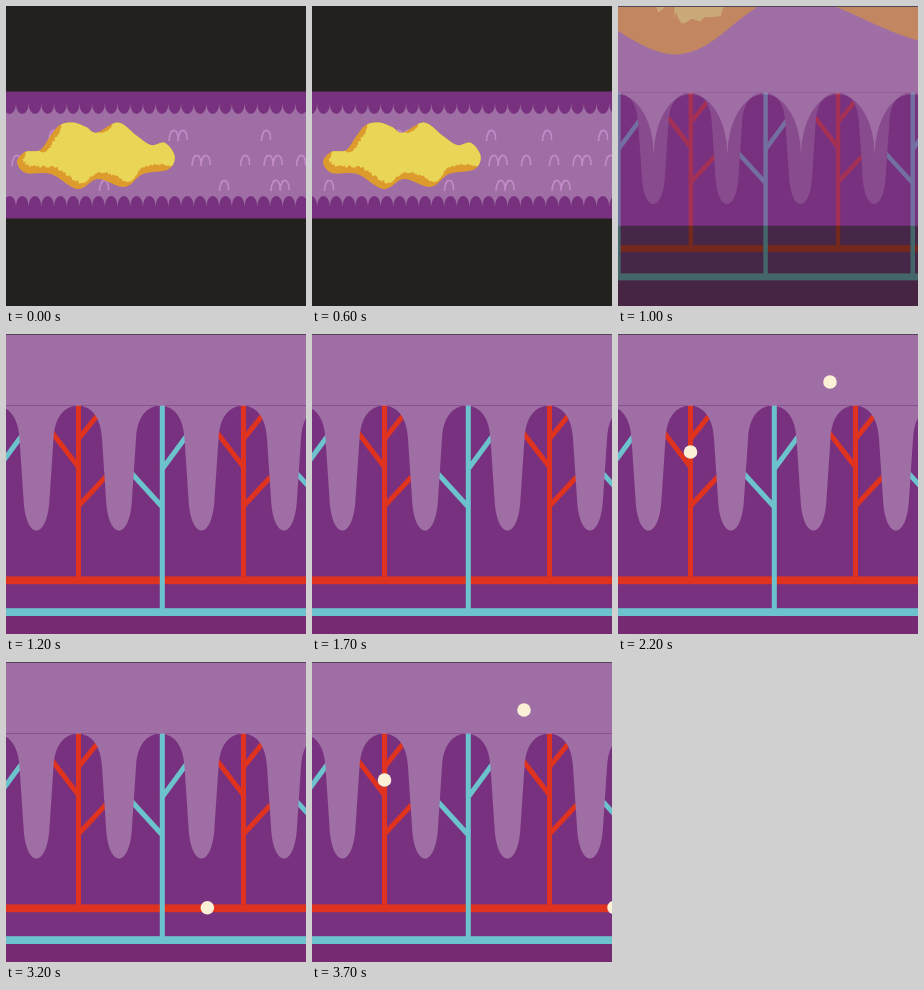
An HTML page with a canvas that plays this animation: 300 px wide and 300 px high, repeating every 3800 ms.

```html
<!DOCTYPE html>
<html lang="en">
<head>
<meta charset="utf-8">
<title>Absorption in the intestine</title>
<style>
html, body { margin: 0; width: 100%; height: 100%; overflow: hidden; background: #22211e; }
canvas { position: absolute; left: 0; top: 0; width: 100%; height: 100%; }
</style>
</head>
<body>
<canvas id="tube" width="300" height="300"></canvas>
<canvas id="villi" width="300" height="300"></canvas>
<script>
const [tubeCtx, villiCtx] = ['tube', 'villi'].map(id => document.getElementById(id).getContext('2d'));
const LOOP = 3800, STEP = 100, ZOOM = 6.5, FOCUS = [75.5, 211.1];
const BLACK = '#22211e', PINK = '#9f6ea4', PURPLE = '#78317f', MARK = '#c48bca',
  YELLOW = '#ead656', ORANGE = '#dd9b2d', RED = '#df321f', TEAL = '#6dc3cd', CREAM = '#fcf0d6';
let ctx = tubeCtx;

const clamp = v => Math.max(0, Math.min(1, v));
const smooth = v => (v = clamp(v)) * v * (3 - 2 * v);
const lerp = (a, b, f) => a + (b - a) * f;
const rand = n => Math.abs(Math.sin(n * 127.1) * 43758.5453) % 1;

function rect(color, x, y, w, h) {
  ctx.fillStyle = color;
  ctx.fillRect(x, y, w, h);
}

function zoomed(scale, paint) {
  ctx.save();
  ctx.translate(...FOCUS);
  ctx.scale(scale, scale);
  ctx.translate(-FOCUS[0], -FOCUS[1]);
  paint();
  ctx.restore();
}

// Key points of the food lump, joined by a closed Catmull-Rom curve.
const LUMP = [[11, 156], [19, 146], [34, 144], [45, 129], [54, 119], [67, 116.5], [80, 121],
  [90.5, 126.7], [112, 116.5], [131, 130], [145, 139], [159, 137], [168.6, 150.5], [162, 163.5],
  [137, 168], [118.5, 181], [92, 173], [71.5, 183], [45, 168], [20, 167]];

function edge(u) {
  const n = LUMP.length, i = Math.floor(u), f = u - i;
  const [a, b, c, d] = [-1, 0, 1, 2].map(k => LUMP[(i + k + n) % n]);
  return [0, 1].map(k => b[k] + 0.5 * f * (c[k] - a[k] +
    f * (2 * a[k] - 5 * b[k] + 4 * c[k] - d[k] + f * (3 * (b[k] - c[k]) + d[k] - a[k]))));
}

function food() {
  const outer = [], inner = [];
  for (let k = 0; k < LUMP.length * 20; k++) {
    const [x, y] = edge(k / 20), [x2, y2] = edge(k / 20 + 0.01);
    const len = Math.hypot(x2 - x, y2 - y), nx = (y2 - y) / len, ny = (x - x2) / len;
    // Edges facing down and left are shaded, with a bristly inner rim.
    const shade = Math.sqrt(clamp(0.6 * ny - 0.8 * nx + 0.2));
    const depth = shade * (6 + 3.5 * rand(k));
    outer.push([x, y]);
    inner.push([x - nx * depth, y - ny * depth]);
  }
  for (const [color, points] of [[ORANGE, outer], [YELLOW, inner]]) {
    ctx.fillStyle = color;
    ctx.beginPath();
    points.forEach(p => ctx.lineTo(...p));
    ctx.fill();
  }
}

function arch(x, y) {
  ctx.moveTo(x - 4.5, y + 5);
  ctx.bezierCurveTo(x - 4, y - 9, x + 5, y - 9, x + 4.5, y + 4);
}

// Folds in the wall weave up and down in a wave, sparser on the left.
function folds(shift) {
  ctx.strokeStyle = MARK;
  ctx.lineWidth = 1.6;
  ctx.beginPath();
  for (let k = -8; k < 13; k++) {
    const wave = Math.cos(k * Math.PI / 2);
    const x = 225 + k * (k < 0 ? 30 : 14) - 7 * wave - shift, y = 155 + 25 * wave;
    if ((k + 10) % 5 < 3) arch(x, y);
    else [-4.5, 4.5].forEach(dx => arch(x + dx, y));
  }
  ctx.stroke();
}

function scallops(shift) {
  ctx.fillStyle = PURPLE;
  ctx.beginPath();
  ctx.rect(0, 85.4, 300, 12.2);
  ctx.rect(0, 200.4, 300, 12.2);
  for (let x = 156 - 12.7 * 13 - shift; x < 310; x += 12.7) {
    for (const y of [97.6, 200.4]) {
      ctx.moveTo(x + 6.35, y);
      ctx.ellipse(x, y, 6.35, 10.5, 0, 0, 2 * Math.PI);
    }
  }
  ctx.fill();
}

function tube(shift) {
  rect(PINK, 0, 86, 300, 126);
  folds(shift);
  scallops(shift);
  food();
}

// A stem with side twigs given as [dx, tip y, joint y], repeated along its vein.
function trees(color, first, foot, twigs) {
  ctx.strokeStyle = color;
  ctx.lineWidth = 5;
  ctx.beginPath();
  for (let x = first; x < 420; x += 165) {
    ctx.moveTo(x, 70);
    ctx.lineTo(x, foot);
    for (const [dx, tip, joint] of twigs) {
      ctx.moveTo(x + dx, tip);
      ctx.lineTo(x, joint);
    }
  }
  ctx.stroke();
  rect(color, -60, foot - 3.8, 420, 7.8);
}

function villi() {
  rect(PURPLE, -60, -60, 420, 420);
  rect('#752b72', -60, 282, 420, 80);
  trees(RED, -92.5, 246.2, [[-27, 98, 133], [20, 80, 105], [27, 143, 172]]);
  trees(TEAL, -8.7, 278, [[25, 101, 135], [-31, 139, 173]]);
  ctx.fillStyle = PINK;
  ctx.beginPath();
  ctx.rect(-60, -60, 420, 132);
  for (let x = -52; x < 420; x += 82.5) {
    ctx.moveTo(x - 41.5, 71.5);
    ctx.bezierCurveTo(x - 27, 72, x - 18, 84, x - 17, 105);
    ctx.lineTo(x - 13, 165);
    ctx.bezierCurveTo(x - 11, 207, x + 11, 207, x + 13, 165);
    ctx.lineTo(x + 17, 105);
    ctx.bezierCurveTo(x + 18, 84, x + 27, 72, x + 41.5, 71.5);
  }
  ctx.fill();
}

// Nutrient routes: [ms after release, x, y]
const ROUTES = [
  [[0, 9, 38], [300, 72.5, 118], [660, 72.5, 246], [1800, 302, 245.5]],
  [[0, 256, 38], [300, 212, 48], [610, 156.3, 135], [850, 156.3, 278], [1300, 327, 278]]
];
const RELEASES = [1900, 3400];

function nutrient(route, t) {
  const i = route.findIndex(p => p[0] >= t);
  if (t < 0 || i < 0) return;
  const b = route[i], a = route[i - 1] || b;
  const f = (t - a[0]) / (b[0] - a[0] || 1);
  ctx.fillStyle = CREAM;
  ctx.beginPath();
  ctx.arc(lerp(a[1], b[1], f), lerp(a[2], b[2], f), 6.8, 0, 7);
  ctx.fill();
}

function draw(t) {
  const scale = lerp(1, ZOOM, smooth((t - 670) / 425));
  ctx = tubeCtx;
  rect(BLACK, 0, 0, 300, 300);
  zoomed(scale, () => tube(Math.min(t, 600) * 0.135));
  if (t > 700) rect('#50485a', 0, 0, 300, 1);

  ctx = villiCtx;
  ctx.canvas.style.opacity = clamp((t - 850) / 350);
  zoomed(scale / ZOOM, villi);
  for (const start of RELEASES) for (const route of ROUTES) nutrient(route, t - start);
  rect('#50485a', 0, 0, 300, 1);
}

let shown = -1;
const begin = performance.now();
function tick() {
  const t = Math.floor((performance.now() - begin) % LOOP / STEP) * STEP;
  if (t !== shown) draw(shown = t);
  requestAnimationFrame(tick);
}
tick();
</script>
</body>
</html>
```
